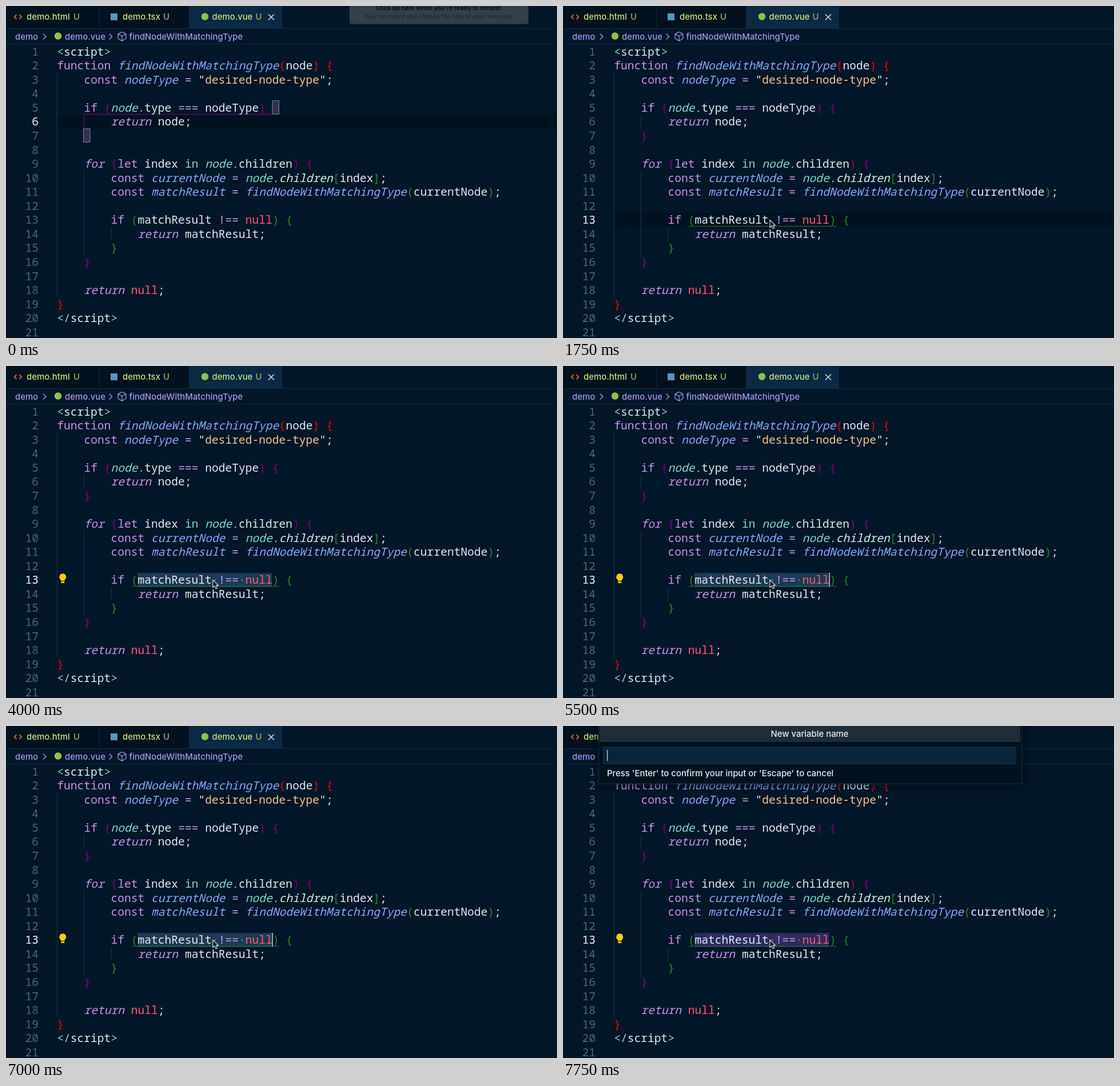
These frames come from a looping animation (964 by 581 pixels, 8000 ms). An HTML page:

```html
<!DOCTYPE html>
<html lang="en">
<head>
<meta charset="utf-8">
<title>Extract variable</title>
<style>
  html, body { margin: 0; width: 100%; height: 100%; overflow: hidden; background: #011627; }
  svg { display: block; width: 964px; height: 581px; }
  text { white-space: pre; }
  .code { font: 500 19.6px "Noto Sans Mono", monospace; font-variant-ligatures: none; }
  .num { font-weight: 400; }
  .ui { font: 500 14.9px Inter, sans-serif; }
  .it { font-style: italic; }
</style>
</head>
<body>
<svg id="stage" viewBox="0 0 964 581" xmlns="http://www.w3.org/2000/svg">
  <defs>
    <filter id="soft" x="-10%" y="-30%" width="120%" height="160%">
      <feGaussianBlur stdDeviation="6"/>
    </filter>
  </defs>
</svg>
<script>
const LOOP = 8000;
const CW = 11.77, LH = 24.55, LEFT = 89.3, TOP = 67.5;
const stage = document.getElementById("stage");
const colX = col => LEFT + col * CW;
const rowY = line => TOP + (line - 1) * LH;

function add(parent, tag, attrs, content) {
  const el = document.createElementNS("http://www.w3.org/2000/svg", tag);
  for (const key in attrs) el.setAttribute(key, attrs[key]);
  if (content !== undefined) el.textContent = content;
  parent.appendChild(el);
  return el;
}
const group = (parent = stage) => add(parent, "g", {});
const rect = (parent, x, y, width, height, fill, more) =>
  add(parent, "rect", { x, y, width, height, fill, ...more });
const path = (parent, d, stroke, width = 1, fill = "none") =>
  add(parent, "path", { d, stroke, "stroke-width": width, fill });
const label = (parent, x, y, text, fill, more) =>
  add(parent, "text", { class: "ui", x, y, fill, ...more }, text);
const show = (el, on) => el.setAttribute("visibility", on ? "visible" : "hidden");

// Tabs and breadcrumb
function drawHeader() {
  const g = group();
  const green = "#c5e478", dim = "#92b15f", violet = "#a599e9", leaf = "#8dc149";
  rect(g, 0, 0, 320, 39, "#01111d");
  rect(g, 163, 0, 1, 39, "#10293c");
  rect(g, 320, 0, 1, 39, "#10293c");
  rect(g, 321, 0, 162, 39, "#0b2942");
  rect(g, 0, 39, 964, 1, "#102b3f");
  rect(g, 0, 66, 964, 1, "#102b3f");

  path(g, "M18.5 15 L14.8 19 L18.5 23 M23.5 15 L27.2 19 L23.5 23", "#e37933", 1.6);
  rect(g, 183, 13, 12, 12, "#519aba");
  add(g, "circle", { cx: 348, cy: 18.5, r: 6.3, fill: leaf });
  label(g, 36, 24, "demo.html", green);
  label(g, 118, 24, "U", dim);
  label(g, 204, 24, "demo.tsx", green);
  label(g, 275, 24, "U", dim);
  label(g, 360.5, 24, "demo.vue", green);
  label(g, 436.5, 24, "U", dim);
  path(g, "M459 14.5 L469 24.5 M469 14.5 L459 24.5", "#d2dee7", 1.5);

  label(g, 16, 58.5, "demo", violet);
  label(g, 103, 58.5, "demo.vue", violet);
  label(g, 215.5, 58.5, "findNodeWithMatchingType", violet);
  for (const x of [65, 180.5]) path(g, `M${x} 48.5 l5 5 l-5 5`, violet, 1.3);
  add(g, "circle", { cx: 91, cy: 52.5, r: 6.3, fill: leaf });
  path(g, "M203 45.5 L209.8 49 V57 L203 61 L196.2 57 V49 Z M196.2 49 L203 52.5 L209.8 49 M203 52.5 V61", violet, 1.3);
}

// Each token starts with a style key
const STYLES = {
  k: "#c792ea", K: "#c792ea", B: "#82aaff", t: "#dfe7f1", e: "#7fdbca", E: "#7fdbca",
  p: "#cff2ea", P: "#cff2ea", s: "#ecc48d", q: "#d9f5dd", n: "#ff5874",
  1: "#f40000", 2: "#800080", 3: "#1f8a22"
};
const LINES = [
  "e<|pscript|e>",
  "kfunction |BfindNodeWithMatchingType|1(|tnode|1) {",
  "t    |kconst |BnodeType |k= |q\"|sdesired-node-type|q\"|t;",
  "",
  "t    |kif |2(|Enode.|ptype |k=== |tnodeType|2) {",
  "t        |Kreturn |tnode;",
  "2    }",
  "",
  "t    |Kfor |2(|klet |tindex |ein |Enode.|pchildren|2) {",
  "t        |kconst |BcurrentNode |k= |Enode.|Pchildren|3[|tindex|3]|t;",
  "t        |kconst |BmatchResult |k= |BfindNodeWithMatchingType|3(|tcurrentNode|3)|t;",
  "",
  "t        |kif |3(|tmatchResult |k!== |nnull|3) {",
  "t            |Kreturn |tmatchResult;",
  "3        }",
  "2    }",
  "",
  "t    |Kreturn |nnull|t;",
  "1}",
  "e</|pscript|e>",
  ""
];

function drawCode() {
  const g = group();
  return LINES.map((line, i) => {
    const y = rowY(i + 1) + 19.2;
    let col = 0;
    for (const token of line ? line.split("|") : []) {
      const key = token[0], text = token.slice(1);
      if (text.trim()) {
        add(g, "text", {
          class: /[A-Z]/.test(key) ? "code it" : "code", x: colX(col), y, fill: STYLES[key]
        }, text);
      }
      col += text.length;
    }
    return add(g, "text", { class: "code num", x: 57, y, "text-anchor": "end" }, i + 1);
  });
}

function drawGuides() {
  const g = group();
  const guide = (x, first, last) =>
    rect(g, x, rowY(first), 1, (last - first + 1) * LH, "#1d3851");
  guide(89, 3, 18);
  guide(136, 6, 6);
  guide(136, 10, 15);
  guide(183.5, 14, 14);
}

function drawBracketScope() {
  const g = group();
  for (const [x, y] of [[466, rowY(5)], [135.5, rowY(7)]]) {
    rect(g, x, y, 11.5, 23.5, "#25384a", { stroke: "#7c8790", "stroke-width": 1 });
  }
  path(g, "M466 189.5 H136.5 V215", "#800080");
  return g;
}

function drawBulb() {
  const g = group();
  path(g, "M99.2 363.3 a6 6 0 0 1 3.4 10.9 V376 h-6.8 V374.2 a6 6 0 0 1 3.4 -10.9 Z", "none", 0, "#ffcc00");
  rect(g, 96.2, 377, 6, 3, "#ffcc00", { rx: 1 });
  return g;
}

function drawRecordHint() {
  const g = group();
  rect(g, 601, -8, 313, 39.5, "#323f4a", { rx: 4 });
  const mid = { "text-anchor": "middle" };
  label(g, 757, 7.2, "Click up here when you're ready to record!", "#07141e",
    { ...mid, style: "font-size:10.6px;font-weight:700" });
  label(g, 757, 22, "You can move and change the size of your selection", "#1a2833",
    { ...mid, style: "font-size:10.5px;font-weight:400" });
  return g;
}

function drawDialog(title, bottom, rows, hint) {
  const g = group();
  const ink = "#e6edf5";
  rect(g, 60, -10, 745, bottom + 14, "#000a14", { filter: "url(#soft)", opacity: .6 });
  rect(g, 62.5, -2, 740, bottom + 2, "#01111d", { stroke: "#142c3f" });
  rect(g, 64, 0, 736, 28, "#202d39");
  label(g, 431.5, 19.2, title, ink, { "text-anchor": "middle" });
  rect(g, 70.5, 36.5, 722, 30, "#0b253a", { stroke: "#0f2c43" });
  if (rows.length) rect(g, 64, 72, 736, 26, "#14334d");
  rows.forEach((row, i) => label(g, 77, 90 + i * 27, row, ink));
  if (hint) label(g, 77, 88.3, hint, ink);
  return g;
}

// Layers, back to front
const rowShade = rect(stage, 90, 0, 874, LH, "#01121f");
const selection = rect(stage, 0, rowY(13), 0, LH, "#1d3b53");
drawGuides();
const oldScope = drawBracketScope();
const parenLine = path(stage, "M220 385.5 H478", "#1f7a22");
const blockLine = path(stage, "M537 287.5 H136.5 V436.5", "#800080");
drawHeader();
const numbers = drawCode();
const dots = group();
for (const col of [23.5, 27.5]) add(dots, "circle", { cx: colX(col), cy: 374.5, r: 1.3, fill: "#6d8294" });
const caret = rect(stage, 0, rowY(13), 1.6, LH - .5, "#b4c6d4");
const bulb = drawBulb();
const hint = drawRecordHint();
const pointer = path(stage,
  "M0 0 V13 L3 10.3 L5.2 15.2 L7.6 14.1 L5.4 9.4 H9.5 Z", "#e8edf2", 1.1, "#05080c");
const dialogs = [
  [6000, 7000, drawDialog("Extract variable to where?", 163, [
    "1 - Extract to local scope in for in statement",
    "2 - Extract to scope in the function named 'findNodeWithMatchingType'",
    "3 - Extract to top of file"])],
  [7250, 7750, drawDialog("Select variable type", 189.5, ["const", "let", "var", "property"])],
  [7750, LOOP, drawDialog("New variable name", 101, [],
    "Press 'Enter' to confirm your input or 'Escape' to cancel")]
];
const inputCaret = rect(stage, 77, 42, 1.2, 19, "#d0dbe6");

const POINTER = [[250, 436.5, 294.5], [500, 372.5, 357.5], [750, 363.5, 369.5], [1000, 362, 374.5]];

function render(t) {
  const within = (from, to) => t >= from && t < to;
  const blinkOn = since => Math.floor((t - since) / 500) % 2 === 0;
  const clicked = t >= 1250, selected = t >= 2750;
  const wide = within(3000, 3500);
  const asking = dialogs.some(([from, to]) => within(from, to));

  show(hint, t < 250);
  const spot = POINTER.filter(([at]) => t >= at).pop();
  show(pointer, !!spot);
  if (spot) pointer.setAttribute("transform", `translate(${spot[1]} ${spot[2]})`);

  const active = clicked ? 13 : 6;
  numbers.forEach((el, i) => el.setAttribute("fill", i + 1 === active ? "#eef5fb" : "#4b6479"));
  rowShade.setAttribute("y", rowY(active));
  show(rowShade, !selected);
  show(oldScope, !clicked);
  show(parenLine, clicked && !wide);
  show(blockLine, wide);

  const from = wide ? 11 : 12, to = wide ? 33 : 32;
  selection.setAttribute("x", colX(from) - .5);
  selection.setAttribute("width", (to - from) * CW);
  selection.setAttribute("fill", asking ? "#2d2d5e" : "#1d3b53");
  show(selection, selected);
  show(dots, selected);

  const since = t < 2750 ? 1250 : t < 3500 ? t : t < 7000 ? 3500 : 7000;
  caret.setAttribute("x", colX(selected ? to : 24) - .5);
  show(caret, clicked && !asking && blinkOn(since));
  show(bulb, within(3000, 3250) || t >= 3750);

  for (const [start, end, el] of dialogs) show(el, within(start, end));
  show(inputCaret, within(6000, 6500) || t >= 7250);
}

function tick() {
  render(performance.now() % LOOP);
  requestAnimationFrame(tick);
}
tick();
</script>
</body>
</html>
```
